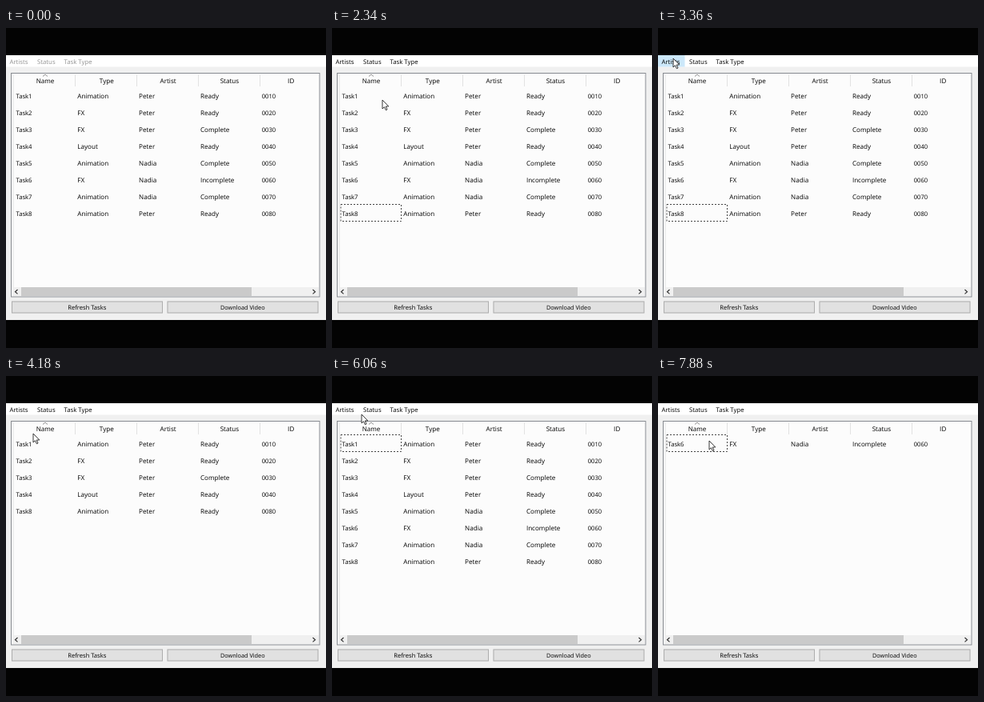
Write an HTML page with a canvas that moves like this. It is 400 px wide and 400 px high and loops after 8000 ms.

```html
<!DOCTYPE html>
<html lang="en">
<head>
<meta charset="utf-8">
<title>Task list</title>
<style>
  html, body { margin: 0; width: 100%; height: 100%; overflow: hidden; background: #030303; }
  canvas { display: block; }
</style>
</head>
<body>
<canvas id="stage" width="400" height="400"></canvas>
<script>
const ctx = document.getElementById('stage').getContext('2d');
const LOOP = 8000;

const headers = ['Name', 'Type', 'Artist', 'Status', 'ID'];
const sizes = [7.7, 8.1, 8.1, 8.1, 7.6];
const tasks = [
  ['Animation', 'Peter', 'Ready'],
  ['FX', 'Peter', 'Ready'],
  ['FX', 'Peter', 'Complete'],
  ['Layout', 'Peter', 'Ready'],
  ['Animation', 'Nadia', 'Complete'],
  ['FX', 'Nadia', 'Incomplete'],
  ['Animation', 'Nadia', 'Complete'],
  ['Animation', 'Peter', 'Ready']
].map((task, i) => [`Task${i + 1}`, ...task, `00${i + 1}0`]);

// Pointer keys: time, x, y
const pointer = [
  [1880, 340, 362], [2340, 63, 90], [2680, 13, 53], [2860, 14, 44],
  [3060, 20, 41], [3280, 20, 41], [3360, 19, 38], [3520, 19, 38],
  [3660, 34, 72], [4700, 34, 72], [4960, 20, 44], [5160, 20, 44],
  [5380, 36, 73], [5740, 36, 73], [6060, 37, 48], [6400, 49, 41],
  [6560, 49, 41], [6880, 64, 81], [LOOP, 64, 81]
];

const within = (t, from, to) => t >= from && t < to;

function box(x, y, w, h, fill, stroke) {
  ctx.fillStyle = fill;
  ctx.fillRect(x, y, w, h);
  if (stroke) {
    ctx.strokeStyle = stroke;
    ctx.lineWidth = 1;
    ctx.strokeRect(x + 0.5, y + 0.5, w - 1, h - 1);
  }
}

function text(str, x, y, size, color = '#000', align = 'left') {
  ctx.font = `${size}px "Open Sans", "Noto Sans", sans-serif`;
  ctx.textRendering = 'geometricPrecision';
  ctx.textAlign = align;
  ctx.fillStyle = color;
  ctx.fillText(str, x, y);
}

function line(points, color, width = 1) {
  ctx.beginPath();
  points.forEach(([x, y]) => ctx.lineTo(x, y));
  ctx.strokeStyle = color;
  ctx.lineWidth = width;
  ctx.stroke();
}

function drawMenu(t) {
  box(0, 34, 400, 14.5, '#fff');
  const overArtists = within(t, 2760, 4120) || within(t, 4840, 5740);
  if (overArtists) box(0, 34, 33.5, 14.5, '#cce8fa');
  if (within(t, 6160, 7800)) box(34, 34, 33, 14.5, '#cce8fa');
  const color = t < 1500 ? '#929292' : '#000';
  text('Artists', 4.5, 44.7, 7.8, color);
  text('Status', 39, 44.7, 7.8, color);
  text('Task Type', 72.5, 44.7, 7.8, color);
}

function drawTable(t) {
  box(6, 56, 386.5, 280.5, '#fcfcfc', '#868a90');
  line([[9.5, 58], [9.5, 324]], '#ececec');
  headers.forEach((name, i) => {
    text(name, 49 + i * 76.8, 68.7, 8.1, '#000', 'center');
    if (i) line([[9.5 + i * 77, 58], [9.5 + i * 77, 73]], '#e2e2e2');
  });
  line([[46, 60.5], [49, 58], [52, 60.5]], '#777', 0.8);

  const rows = tasks.filter(task =>
    within(t, 4120, 5740) ? task[2] === 'Peter' :
    t >= 7800 ? task[3] === 'Incomplete' : true);
  rows.forEach((row, r) => row.forEach((cell, c) =>
    text(cell, 12.5 + c * 76.8, 87.5 + r * 21, sizes[c])));

  const focus = within(t, 1500, 4120) ? 7 : t >= 5740 ? 0 : -1;
  if (focus >= 0) {
    ctx.setLineDash([2, 2]);
    ctx.strokeStyle = '#444';
    ctx.lineWidth = 1;
    ctx.strokeRect(11, 73.5 + focus * 21, 75.5, 21);
    ctx.setLineDash([]);
  }

  box(8, 324, 383, 11, '#f0f0f0');
  box(19, 324, 288, 11, '#cacaca');
  line([[14.5, 327], [11.5, 329.7], [14.5, 332.4]], '#333', 1.2);
  line([[383.5, 327], [386.5, 329.7], [383.5, 332.4]], '#333', 1.2);
}

function drawButton(x, label, size) {
  box(x, 341.5, 189, 15, '#e1e1e1', '#adadad');
  text(label, x + 94.3, 352, size, '#000', 'center');
}

function drawPointer(t) {
  const next = pointer.findIndex(key => key[0] > t);
  if (next < 1) return;
  const [t0, x0, y0] = pointer[next - 1], [t1, x1, y1] = pointer[next];
  const p = (t - t0) / (t1 - t0), e = p * p * (3 - 2 * p);
  ctx.save();
  ctx.translate(x0 + (x1 - x0) * e, y0 + (y1 - y0) * e);
  ctx.fillStyle = '#fff';
  ctx.strokeStyle = '#222';
  ctx.lineWidth = 0.9;
  const arrow = new Path2D('M0 0V11L2.5 8.7L4.3 12.7L6 12L4.3 8H7.8Z');
  ctx.fill(arrow);
  ctx.stroke(arrow);
  ctx.restore();
}

function draw(now) {
  const t = now % LOOP;
  box(0, 0, 400, 400, '#030303');
  ctx.save();
  ctx.beginPath();
  ctx.rect(0, 34, 400, 331);
  ctx.clip();
  box(0, 34, 400, 331, '#f0f0f0');
  drawMenu(t);
  drawTable(t);
  drawButton(7, 'Refresh Tasks', 7.6);
  drawButton(201.5, 'Download Video', 7.3);
  drawPointer(t);
  ctx.restore();
  requestAnimationFrame(draw);
}
requestAnimationFrame(draw);
</script>
</body>
</html>
```
